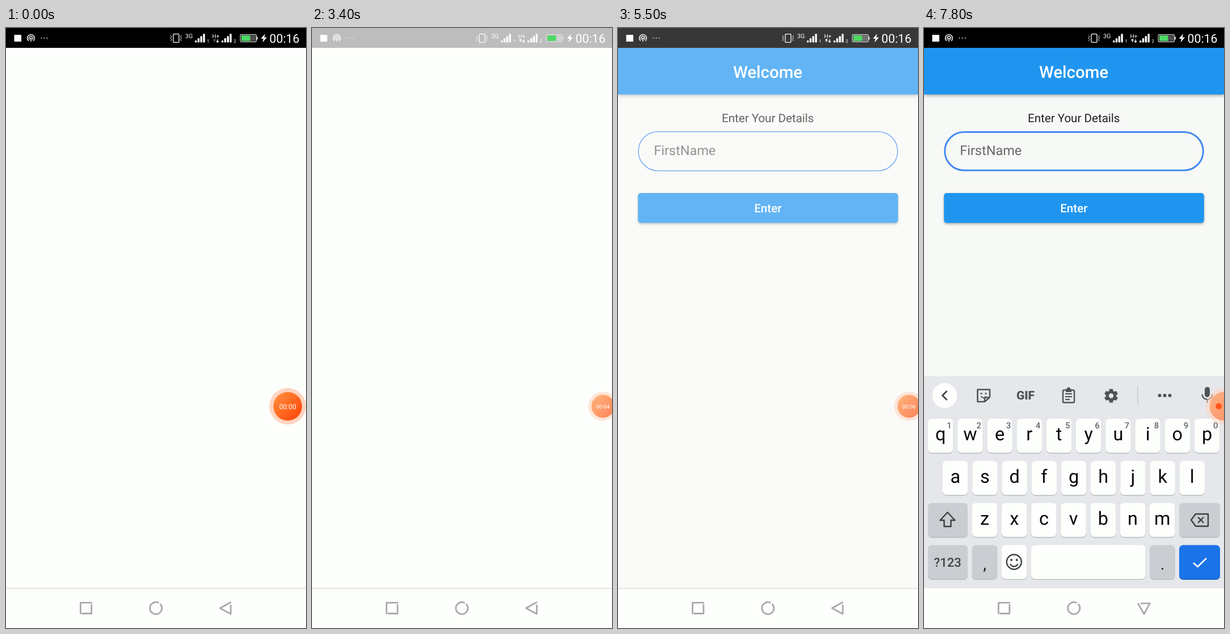
Animation of 529x1058 px, one loop 8 s. Source, as an HTML page with a canvas:

```html
<!DOCTYPE html>
<html lang="en">
<head>
<meta charset="utf-8">
<title>Welcome form</title>
<style>
html, body { margin: 0; width: 100%; height: 100%; overflow: hidden; background: #fdfffc; }
canvas { display: block; }
</style>
</head>
<body>
<canvas id="stage" width="529" height="1058"></canvas>
<script>
const c = document.getElementById('stage').getContext('2d');
const LOOP = 8000, STEP = 100, TAU = Math.PI * 2;
const PAPER = '#fdfffc', BLUE = '#2095f0', DARK = '#505357';
c.textRendering = 'geometricPrecision';
c.lineJoin = 'round';

const clamp = v => Math.max(0, Math.min(1, v));
const span = (t, from, to) => clamp((t - from) / (to - from));
const mix = (a, b, p) => a + (b - a) * p;
const easeOut = p => 1 - (1 - p) ** 3;
const smooth = p => p * p * (3 - 2 * p);

// Solves a CSS-style cubic Bezier timing curve.
function bezier(x1, y1, x2, y2, x) {
  const at = (a, b, u) => 3 * a * u * (1 - u) ** 2 + 3 * b * u * u * (1 - u) + u ** 3;
  let lo = 0, hi = 1;
  for (let i = 0; i < 24; i++) {
    const mid = (lo + hi) / 2;
    if (at(x1, x2, mid) < x) lo = mid; else hi = mid;
  }
  return at(y1, y2, lo);
}

function rect(x, y, w, h, fill) {
  c.fillStyle = fill;
  c.fillRect(x, y, w, h);
}
function round(x, y, w, h, r) {
  c.beginPath();
  c.roundRect(x, y, w, h, r);
}
function disc(x, y, r, fill) {
  c.beginPath();
  c.arc(x, y, r, 0, TAU);
  c.fillStyle = fill;
  c.fill();
}
function pen(color, width) {
  c.strokeStyle = color;
  c.lineWidth = width;
}
function arc(x, y, r, from = 0, to = TAU) {
  c.beginPath();
  c.arc(x, y, r, from, to);
  c.stroke();
}
function trace(points, closed) {
  c.beginPath();
  for (let i = 0; i < points.length; i += 2) c.lineTo(points[i], points[i + 1]);
  if (closed) c.closePath();
}
function line(...points) {
  trace(points);
  c.stroke();
}
function outline(...points) {
  trace(points, true);
  c.stroke();
}
function text(str, x, y, size, color, weight = 400, align = 'center') {
  c.font = `${weight} ${size}px Roboto, sans-serif`;
  c.textAlign = align;
  c.fillStyle = color;
  c.fillText(str, x, y);
}
function withShadow(color, blur, dy, draw) {
  c.save();
  c.shadowColor = color;
  c.shadowBlur = blur;
  c.shadowOffsetY = dy;
  draw();
  c.restore();
}

function signal(x) {
  for (let i = 0; i < 4; i++) {
    const h = 3.5 + i * 3.9;
    round(x + i * 4.8, 25.5 - h, 3.4, h, 1);
    c.fillStyle = '#fff';
    c.fill();
  }
}

function statusBar(shade, uploadDim) {
  const v = Math.round(shade);
  rect(0, 0, 529, 35, `rgb(${v},${v},${v})`);
  rect(14.5, 12, 12.5, 12, '#fff');

  pen('#fff', 1.5);
  arc(44, 18, 6.4, 2.3, 7.13);
  arc(44, 18, 3.4, 2.3, 7.13);
  disc(44, 18.3, 1.4, '#fff');
  line(44, 18, 44, 24);
  for (const x of [62.5, 67.5, 72.5]) disc(x, 17.7, 1, '#ddd');

  pen('#fff', 1.3);
  round(295, 10.7, 10, 14.6, 1);
  c.stroke();
  pen('#fff', 1);
  line(290, 13, 292, 15.5, 290, 18, 292, 20.5, 290, 23);
  line(309.5, 13, 307.5, 15.5, 309.5, 18, 307.5, 20.5, 309.5, 23);

  text('3G', 316, 18, 10.8, '#fff', 400, 'left');
  signal(333);
  text('1', 356.5, 25.5, 8, '#fff');
  text('H+', 363.5, 17.5, 10, '#fff', 400, 'left');
  pen(uploadDim ? '#666' : '#fff', 1.3);
  line(367.5, 25, 367.5, 20);
  line(365.5, 22, 367.5, 19.8, 369.5, 22);
  pen('#fff', 1.3);
  line(373, 20, 373, 25);
  line(371, 23, 373, 25.2, 375, 23);
  signal(380);
  text('2', 403.5, 25.5, 8, '#fff');

  pen('#ddd', 1.2);
  round(413.2, 11.6, 28.2, 12.8, 1.5);
  c.stroke();
  rect(415, 13.2, 25, 9.6, 'rgba(255,255,255,.3)');
  rect(415, 13.2, 15.5, 9.6, '#4cd964');
  rect(442, 15.5, 1.8, 5, '#ddd');
  trace([457, 10, 449.5, 18.7, 454, 18.7, 452.3, 25.5, 460, 16.5, 455.4, 16.5], true);
  c.fillStyle = '#fff';
  c.fill();
  text('00:16', 491, 26, 21.3, '#fff');
}

function page(focus) {
  rect(0, 35, 529, 953, '#f7f9f6');
  withShadow('rgba(0,0,0,.35)', 6, 2, () => rect(0, 35, 529, 82.3, BLUE));
  text('Welcome', 264, 87.5, 29.4, '#fff', 500);
  text('Enter Your Details', 264.2, 166, 20.57, '#202120');

  // The border grows inwards from a fixed outer edge.
  const border = mix(1.5, 3, focus);
  pen('#438af3', border);
  round(35.2 + border / 2, 182 + border / 2, 458.6 - border, 70.5 - border, 35);
  c.stroke();
  text('FirstName', 63.2, 224, 23.5, '#666866', 400, 'left');

  withShadow('rgba(0,0,0,.3)', 4, 2, () => {
    round(35.2, 291, 458.6, 52.8, 5);
    c.fillStyle = BLUE;
    c.fill();
  });
  text('Enter', 264.3, 325, 20.6, '#fff', 500);
}

function navBar(keyboardUp) {
  rect(0, 988, 529, 70, PAPER);
  if (!keyboardUp) rect(0, 987.5, 529, 1.5, '#dcdedc');
  pen('#a9aaa9', 2.8);
  line(152, 1013.3, 131.4, 1013.3, 131.4, 1033.5);
  line(150.8, 1016, 150.8, 1032.5, 133.5, 1032.5);
  arc(264.3, 1023, 10.6, -0.8, TAU - 1.05);
  c.save();
  c.translate(388, 1023);
  if (keyboardUp) c.rotate(-Math.PI / 2);
  line(8.3, -6, 8.3, 10.2, -10.5, 0, 8.8, -10.8);
  c.restore();
}

function key(x, y, w, fill = PAPER, edge = '#b6b9bd') {
  round(x, y + 1.2, w, 60.2, 7);
  c.fillStyle = edge;
  c.fill();
  round(x, y, w, 60, 7);
  c.fillStyle = fill;
  c.fill();
}
function letterRow(letters, x, y, numbered) {
  [...letters].forEach((ch, i) => {
    const left = x + i * 52.2;
    key(left, y, 44.4);
    text(ch, left + 22.2, y + 38, 32.4, '#050505');
    if (numbered) text((i + 1) % 10, left + 37.5, y + 17, 15, '#63666a', 500);
  });
}

function toolbar() {
  disc(36.5, 648, 22, PAPER);
  pen('#3c4043', 2.5);
  line(40.5, 640, 32.5, 648, 40.5, 656);

  pen(DARK, 2.6);
  line(116, 651, 116, 637.5, 94.5, 637.5, 94.5, 659, 107, 659, 116, 651);
  line(107, 658, 107, 651.5, 115, 651.5);
  disc(101, 644.5, 1.6, DARK);
  disc(109, 644.5, 1.6, DARK);
  pen(DARK, 2);
  arc(105, 647, 5, 0.5, 2.6);

  text('GIF', 179, 655, 21, DARK, 900);

  pen(DARK, 2.5);
  round(245, 638.5, 20, 22, 2);
  c.stroke();
  rect(250, 636.5, 10, 5.5, DARK);
  disc(255, 636.5, 3, DARK);
  [645, 650, 655].forEach((y, i) => rect(249, y - 1, i < 2 ? 12 : 8, 2.2, DARK));

  for (let i = 0; i < 6; i++) {
    c.save();
    c.translate(330, 648.5);
    c.rotate(i * TAU / 6);
    rect(-3.3, -12, 6.6, 6, DARK);
    c.restore();
  }
  pen(DARK, 5.2);
  arc(330, 648.5, 6.8);

  rect(376.3, 632, 1.3, 32, '#c3c6ca');
  for (const x of [415.5, 424.5, 433.5]) disc(x, 648, 3, DARK);

  round(495, 633, 9, 18, 4.5);
  c.fillStyle = DARK;
  c.fill();
  pen(DARK, 2.4);
  arc(499.5, 646, 9, 0, Math.PI);
  line(499.5, 655, 499.5, 661);
}

function keyboard() {
  rect(0, 614, 529, 374, '#e5e7eb');
  toolbar();
  letterRow('qwertyuiop', 7, 689, true);
  letterRow('asdfghjkl', 33, 763.5);
  letterRow('zxcvbnm', 84.8, 837.5);

  const grey = '#cacdd1', bottom = 911.7;
  key(7, 837.5, 70, grey);
  key(450, 837.5, 72, grey);
  key(7, bottom, 70, grey);
  key(84.8, bottom, 44.4, grey);
  key(137, bottom, 44.4);
  key(189, bottom, 201.5);
  key(398.2, bottom, 44.4, grey);
  key(450, bottom, 72, '#1a73e8', '#1a5fb8');

  pen('#3c4043', 2.4);
  outline(41.5, 854, 54.5, 868, 47.5, 868, 47.5, 879, 35.5, 879, 35.5, 868, 28.5, 868);
  outline(471, 867.5, 479, 857, 501, 857, 501, 878.5, 479, 878.5);
  line(483, 862.5, 493, 872.5);
  line(493, 862.5, 483, 872.5);

  text('?123', 41.7, 950, 22, '#3f4246', 500);
  text(',', 107, 955, 29, '#222');
  text('.', 420.5, 955, 29, '#222');

  pen('#3c4043', 2.4);
  arc(158.8, 941.5, 13);
  disc(154, 938, 2, '#3c4043');
  disc(163.6, 938, 2, '#3c4043');
  arc(158.8, 942.5, 7, 0.35, 2.8);

  pen('#fff', 2.5);
  line(475, 943, 482.5, 950, 498, 935);
}

function bubble(t) {
  const shrink = smooth(span(t, 1400, 1700));
  const hide = smooth(span(t, 6400, 6900));
  const size = mix(mix(1, 0.8, shrink), 1, hide);
  const x = mix(mix(496.7, 513, shrink), 529, hide);
  const seconds = Math.floor((t + 600) / 1000);

  c.save();
  c.translate(x, 667);
  c.scale(size, size);
  c.globalAlpha = mix(1, 0.6, shrink);
  disc(0, 0, 32.3, '#ffd5c1');
  const fill = c.createLinearGradient(-18, -18, 18, 18);
  fill.addColorStop(0, '#ff8838');
  fill.addColorStop(1, '#ff4b0b');
  disc(0, 0, 25.3, fill);
  c.globalAlpha = hide * 0.35;
  disc(0, 0, 25.3, '#ffb08a');
  c.globalAlpha = 1 - hide;
  text('00:0' + seconds, 0, 4.5, 12, '#fff');
  c.globalAlpha = hide;
  disc(-9.3, 0, 5.4, '#ff5417');
  c.restore();
}

function draw(t) {
  const dim = smooth(span(t, 300, 900));
  const reveal = t < 5200 ? 0 : bezier(0.4, 0, 0.2, 1, span(t, 5133, 5945));
  const focus = span(t, 7000, 7200);
  const rise = span(t, 7300, 7700);
  const keyboardUp = rise > 0;

  rect(0, 0, 529, 1058, PAPER);
  if (reveal > 0) {
    page(focus);
    c.globalAlpha = 1 - reveal;
    rect(0, 35, 529, 953, PAPER);
    c.globalAlpha = 1;
  }
  if (keyboardUp) {
    c.save();
    c.beginPath();
    c.rect(0, 35, 529, 953);
    c.clip();
    c.globalAlpha = easeOut(rise);
    c.translate(0, 75 * (1 - easeOut(rise)));
    keyboard();
    c.restore();
  }
  statusBar(189 * dim * (1 - reveal), t < 100);
  navBar(keyboardUp);
  bubble(t);
}

function tick(now) {
  draw(Math.floor(now % LOOP / STEP) * STEP);
  requestAnimationFrame(tick);
}
draw(0);
requestAnimationFrame(tick);
</script>
</body>
</html>
```
